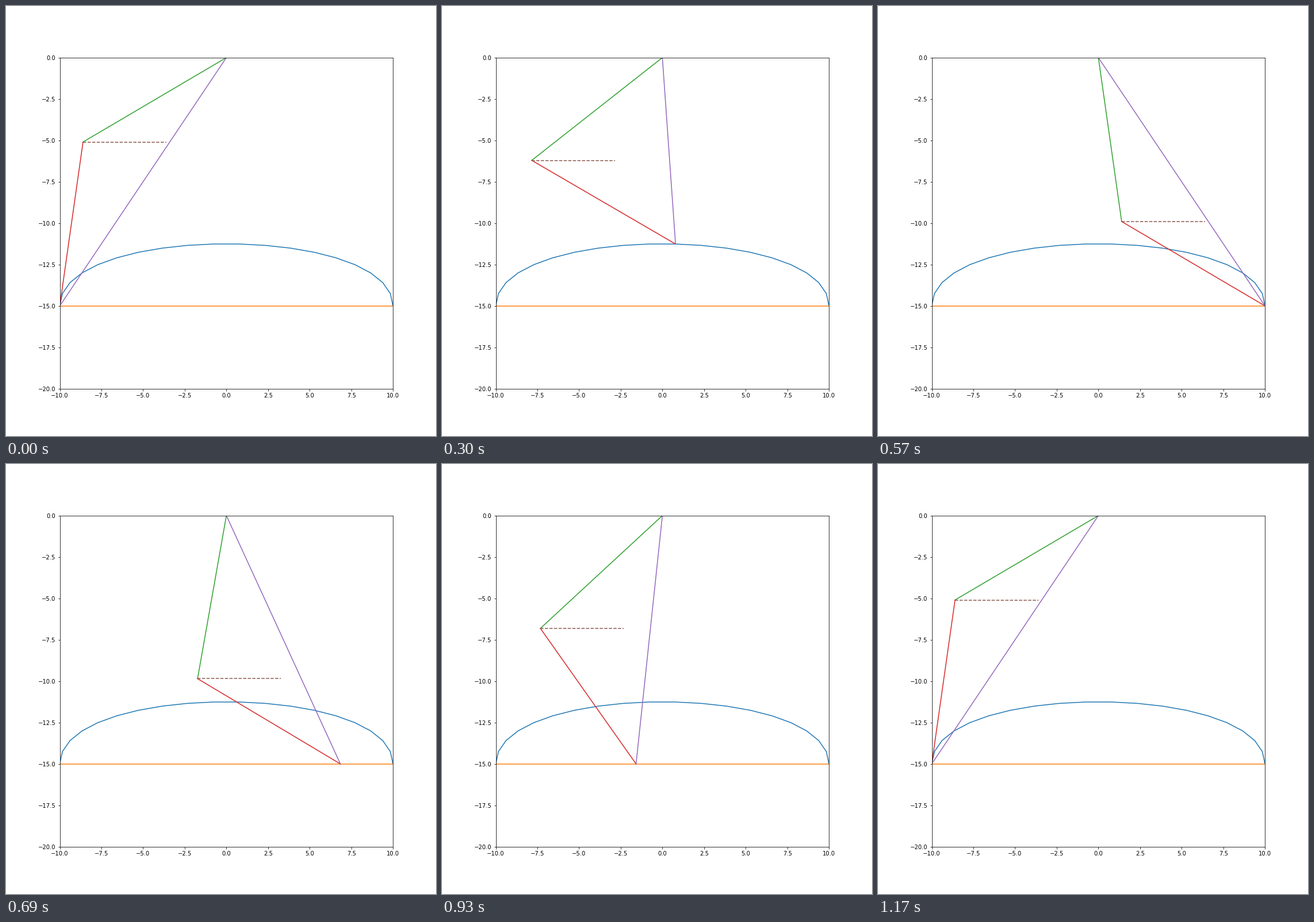
Recreate the animation shown at these times as a matplotlib script. Size 748 by 748 pixels, loop 1.2 s.

```python
import numpy as np
import matplotlib.pyplot as plt
from matplotlib.animation import FuncAnimation

DPI = 72
SIZE = 748
STEPS = 20        # samples in each half of the step cycle
LINK = 10.0       # length of both leg segments
GUIDE = 5.0       # length of the horizontal reference line


def bezier(points, t):
    """Cubic Bezier curve through four control points."""
    p0, p1, p2, p3 = np.array(points, dtype=float)
    t = t[:, None]
    u = 1 - t
    return u**3 * p0 + 3 * u**2 * t * p1 + 3 * u * t**2 * p2 + t**3 * p3


def knee_for(foot):
    """Left-hand knee position for a hip at the origin."""
    x, y = foot
    reach = np.hypot(x, y)
    angle = np.arctan2(y, x) - np.arccos(reach / (2 * LINK))
    return LINK * np.cos(angle), LINK * np.sin(angle)


t = np.linspace(0, 1, STEPS)
swing = bezier([(-10, -15), (-10, -10), (10, -10), (10, -15)], t)
stance = np.column_stack([np.linspace(10, -10, STEPS), np.full(STEPS, -15.0)])
path = np.vstack([swing, stance])

fig, ax = plt.subplots(figsize=(SIZE / DPI, SIZE / DPI), dpi=DPI)
ax.set_xlim(-10, 10)
ax.set_ylim(-20, 0)

ax.plot(*swing.T, color="C0")
ax.plot(*stance.T, color="C1")
thigh, = ax.plot([], [], color="C2")
shin, = ax.plot([], [], color="C3")
leg, = ax.plot([], [], color="C4")
guide, = ax.plot([], [], "--", color="C5")


def update(i):
    x, y = path[i]
    kx, ky = knee_for(path[i])
    thigh.set_data([0, kx], [0, ky])
    shin.set_data([kx, x], [ky, y])
    leg.set_data([0, x], [0, y])
    guide.set_data([kx, kx + GUIDE], [ky, ky])
    return thigh, shin, leg, guide


anim = FuncAnimation(fig, update, frames=len(path), interval=30, repeat=True)
plt.show()
```
